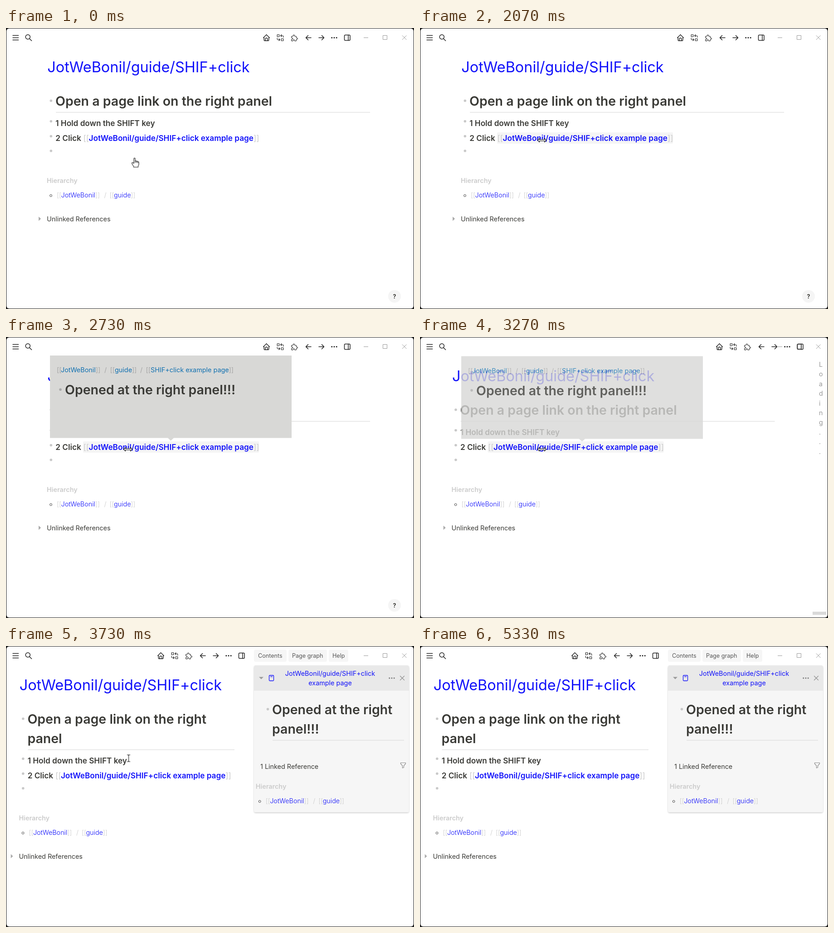
Write an HTML page that moves like this. It is 900 px wide and 622 px high and loops after 5.99 s.

```html
<!DOCTYPE html>
<html lang="en">
<head>
<meta charset="utf-8">
<title>Open a page link on the right panel</title>
<style>
html, body { margin: 0; width: 100%; height: 100%; overflow: hidden; background: #1c1c1c; }
svg {
  display: block; width: 900px; height: 622px;
  font: 14.4px Inter, sans-serif; font-optical-sizing: none;
  animation: panel 5990ms step-end infinite;
}
text { fill: #3a3a36; white-space: pre; }
.title { font-size: 32.4px; }
.h1 { font-size: 28.5px; font-weight: 600; }
.h3 { font-size: 17.17px; font-weight: 600; }
.link { fill: #1212fa; }
.ref { fill: #1070b0; }
.faint { fill: #cbcbcb; }
.light { font-weight: 300; }
.normal { font-weight: 400; }
.tab { font-size: 12.6px; fill: #555; }
.load { fill: #999; }
.slash { fill: #a5a5a5; }
.dot { fill: #c9c9c9; }
.line { fill: #dcdcdc; }
.ico { fill: none; stroke: #222; stroke-width: 1.5; stroke-linecap: round; stroke-linejoin: round; }
.big { stroke-width: 1.9; }
.grey { stroke: #8f8f8f; stroke-width: 1.2; }
.blue { stroke: #1212fa; stroke-width: 1.3; }
.thin { fill: none; stroke: #999; }

/* Visible only while the current state --s equals the element's own --n. */
.pick { opacity: calc(1 - max(var(--s) - var(--n), var(--n) - var(--s))); }

.main { transform: translateX(calc(-1 * min(61.6px, .6 * var(--w)))); }
.icons { transform: translateX(calc(min(1, var(--s)) * (120px - var(--w)))); }
.side { transform: translateX(calc(353px - var(--w))); }
.below { transform: translateY(calc(43px * var(--wrap))); }
.rule { width: min(693px, calc(808.6px - var(--w))); }
.flat { fill-opacity: calc(1 - var(--wrap)); }
.wrapped { fill-opacity: var(--wrap); }

.hover { animation: hover 5990ms linear infinite; }
.popup { animation: popup 5990ms linear infinite; }
.cursor { animation: move 5990ms linear infinite, shape 5990ms step-end infinite; }
.cursor path { fill: #fff; stroke: #111; stroke-width: 1.1; stroke-linejoin: round; }
.cursor .beam { fill: none; }

/* --w panel width, --s panel state, --wrap heading on two lines */
@keyframes panel {
  0% { --w: 0px; --s: 0; --wrap: 0; }
  53.41% { --w: 8px; --s: 1; --wrap: 0; }
  54.57% { --w: 34px; --s: 1; --wrap: 0; }
  55.58% { --w: 110px; --s: 2; --wrap: 0; }
  56.75% { --w: 195px; --s: 2; --wrap: 0; }
  57.92% { --w: 265px; --s: 2; --wrap: 0; }
  58.92% { --w: 314px; --s: 2; --wrap: 0; }
  60.08% { --w: 340px; --s: 2; --wrap: 1; }
  61.25% { --w: 350px; --s: 2; --wrap: 1; }
  62.26%, 100% { --w: 353px; --s: 3; --wrap: 1; }
}
@keyframes hover {
  0%, 16.68% { opacity: 0; animation-timing-function: steps(4, start); }
  21.1%, 60.07% { opacity: 1; }
  60.08%, 100% { opacity: 0; }
}
@keyframes popup {
  0%, 38.8% { opacity: 0; transform: translate(97px, 50.6px); animation-timing-function: steps(3, start); }
  42.1% { opacity: .51; transform: translate(97px, 45.3px); animation-timing-function: steps(4, start); }
  46.5%, 53.3% { opacity: 1; transform: translate(97px, 40.6px); }
  53.31% { opacity: 1; transform: translate(91px, 40.6px); animation-timing-function: steps(2, start); }
  55.5% { opacity: .8; transform: translate(91px, 42.4px); animation-timing-function: steps(4, start); }
  59.9% { opacity: .13; transform: translate(91px, 49.5px); animation-timing-function: steps(2, start); }
  62.1%, 100% { opacity: 0; transform: translate(91px, 50.6px); }
}
@keyframes move {
  0%, 2.16% { transform: translate(283.5px, 287.5px); animation-timing-function: steps(9, start); }
  12.18% { transform: translate(283px, 272px); animation-timing-function: steps(9, start); }
  22.2%, 25.53% { transform: translate(270.7px, 251.5px); animation-timing-function: steps(9, start); }
  35.55%, 56.74% { transform: translate(269px, 248.5px); }
  56.75%, 63.4% { transform: translate(270.5px, 248.5px); animation-timing-function: steps(7, start); }
  71.2%, 73.4% { transform: translate(235.5px, 278.5px); animation-timing-function: steps(9, start); }
  83.4% { transform: translate(186px, 511px); animation-timing-function: steps(6, start); }
  89.9%, 100% { transform: translate(162px, 626px); }
}
/* 0 hand, 1 text beam, 2 resize, 3 arrow */
@keyframes shape {
  0% { --s: 0; }
  6.67% { --s: 1; }
  16.68% { --s: 0; }
  33.37% { --s: 2; }
  56.75% { --s: 1; }
  67.93% { --s: 0; }
  75.6%, 100% { --s: 3; }
}
</style>
</head>
<body>
<svg viewBox="0 0 900 622">
  <defs>
    <clipPath id="tabs"><rect width="765" height="40"/></clipPath>
    <filter id="shadow" x="-5%" y="-5%" width="110%" height="112%">
      <feDropShadow dx="0" dy="1.5" stdDeviation="1.5" flood-opacity=".2"/>
    </filter>
    <g id="tree">
      <text class="faint" x="90" y="343" font-weight="600">Hierarchy</text>
      <circle cx="99" cy="371" r="2.4" fill="none" stroke="#444"/>
      <text class="faint light" y="375"><tspan x="112">[[</tspan><tspan class="link" x="121.5">JotWeBonil</tspan>]]<tspan x="216.5">/</tspan><tspan x="228.5">[[</tspan><tspan class="link" x="238">guide</tspan>]]</text>
    </g>
    <g id="dots" stroke="none"><circle cx="-5.2" r="1.5"/><circle r="1.5"/><circle cx="5.2" r="1.5"/></g>
  </defs>

  <rect x="1" y="1" width="898" height="620" rx="6" fill="#fff"/>

  <g class="main">
    <text class="title link" x="91.3" y="97.5">JotWeBonil/guide/SHIF+click</text>
    <circle class="dot" cx="99.3" cy="161" r="2.8"/>
    <text class="h1" x="109" y="171.8">Open a page link on the right <tspan class="flat">panel</tspan></text>
    <text class="h1 wrapped" x="109" y="214.8">panel</text>
    <g class="below">
      <rect class="line rule" x="110" y="186" height="1.2"/>
      <circle class="dot" cx="99.3" cy="206.5" r="2.8"/>
      <circle class="dot" cx="99.3" cy="239.5" r="2.8"/>
      <circle class="dot" cx="99.3" cy="272" r="2.8"/>
      <rect class="hover" x="170" y="231" width="388" height="25" rx="2" fill="#f5f5f5"/>
      <text class="h3" x="109.3" y="217">1 Hold down the SHIFT key</text>
      <text class="h3" x="109.3" y="250">2 Click</text>
      <text class="h3 faint" y="250"><tspan class="normal" x="170.5">[[</tspan><tspan class="link" x="182.5">JotWeBonil/guide/SHIF+click example page</tspan><tspan class="normal">]]</tspan></text>
      <use href="#tree"/>
      <path d="M72 417.5l5 4.8-5 4.8z" fill="#aaa"/>
      <text x="90" y="428.3">Unlinked References</text>
    </g>
  </g>

  <path class="ico" d="M15 16.5h12.5M15 21.5h12.5M15 26.5h12.5M52 23.7l4.5 4.5"/>
  <circle class="ico" cx="48.2" cy="19.8" r="5"/>
  <path class="thin" d="M789 21.5h10M831.5 16.5h9v9h-9zM874 16.5l9.5 9.5m0-9.5l-9.5 9.5"/>

  <g clip-path="url(#tabs)">
    <g class="side">
      <g fill="#f6f6f6">
        <rect x="547" y="8" width="72" height="27" rx="4"/>
        <rect x="623" y="8" width="85" height="27" rx="4"/>
        <rect x="712" y="8" width="43" height="27" rx="4"/>
      </g>
      <text class="tab" y="26"><tspan x="556">Contents</tspan><tspan x="631">Page graph</tspan><tspan x="720">Help</tspan></text>
    </g>
  </g>

  <g class="side">
    <g class="pick" style="--n:1">
      <text class="load" x="561 561 561 561 561 561 561 561 561 561" y="66 87.4 108.8 130.2 151.6 173 194.4 215.8 237.2 258.6">Loading...</text>
      <rect x="547" y="608" width="30" height="7" fill="#d9d9d9"/>
    </g>
    <text class="pick load" style="--n:2" x="560.5" y="66">Loading ...</text>
    <g class="pick" style="--n:3">
      <rect x="547" y="43" width="342" height="325" rx="4" fill="#f6f6f6" filter="url(#shadow)"/>
      <path d="M547 99V47a4 4 0 0 1 4-4h334a4 4 0 0 1 4 4v52z" fill="#e9e9e9"/>
      <path d="M558 68.5h10l-5 5z" fill="#999"/>
      <rect class="ico blue" x="580.5" y="65" width="10" height="12" rx="1.5"/>
      <path class="ico blue" d="M583.5 67.8h4"/>
      <g text-anchor="middle">
        <text class="link" x="715" y="66">JotWeBonil/guide/SHIF+click</text>
        <text class="link" x="715" y="87.3">example page</text>
      </g>
      <use href="#dots" x="851" y="71" fill="#777"/>
      <path class="ico grey" d="M869.5 66.5l9 9m0-9l-9 9"/>
      <circle class="dot" cx="577.5" cy="139.8" r="2.8"/>
      <text class="h1" x="587" y="150.5">Opened at the right</text>
      <text class="h1" x="587" y="193.5">panel!!!</text>
      <rect class="line" x="588" y="208" width="290" height="1.2"/>
      <text x="561" y="272">1 Linked Reference</text>
      <path class="ico grey" d="M870.5 258.5h11v2l-4 4.5v4l-3 1v-5l-4-4.5z"/>
      <use href="#tree" x="460.7" y="-27"/>
    </g>
  </g>

  <g class="icons">
    <path class="ico big" transform="translate(565.5 12.5) scale(.75)" d="M5 12H3l9-9 9 9h-2M5 12v7a2 2 0 0 0 2 2h10a2 2 0 0 0 2-2v-7M9 21v-6a2 2 0 0 1 2-2h2a2 2 0 0 1 2 2v6"/>
    <path class="ico" transform="translate(596 12.5) scale(.75)" d="M3 3h6v6H3zM15 15h6v6h-6zM21 11V8a2 2 0 0 0-2-2h-6l3 3m0-6l-3 3M3 13v3a2 2 0 0 0 2 2h6l-3-3m0 6l3-3"/>
    <path class="ico" transform="translate(627.5 13) scale(.75)" d="M4 7h3a1 1 0 0 0 1-1V5a2 2 0 0 1 4 0v1a1 1 0 0 0 1 1h3a1 1 0 0 1 1 1v3a1 1 0 0 0 1 1h1a2 2 0 0 1 0 4h-1a1 1 0 0 0-1 1v3a1 1 0 0 1-1 1h-3a1 1 0 0 1-1-1v-1a2 2 0 0 0-4 0v1a1 1 0 0 1-1 1H4a1 1 0 0 1-1-1v-3a1 1 0 0 1 1-1h1a2 2 0 0 0 0-4H4a1 1 0 0 1-1-1V8a1 1 0 0 1 1-1"/>
    <path class="ico" d="M673 21.5h-11.5l5-5m-5 5l5 5M690 21.5h11.5l-5-5m5 5l-5 5"/>
    <use href="#dots" x="724" y="21.5" fill="#222"/>
    <rect class="ico" x="746.5" y="15.5" width="12.5" height="12" rx="2"/>
    <path class="ico" d="M755 15.5v12"/>
  </g>

  <g class="pick" style="--n:0">
    <circle cx="857" cy="594" r="14" fill="#f5f5f5"/>
    <text x="857" y="598.6" font-size="12.6" font-weight="700" text-anchor="middle">?</text>
  </g>

  <g class="popup">
    <path d="M0 0h533v183H273l-6.5 6-6.500-6H0z" fill="#d8d8d6"/>
    <text class="slash" y="37.4"><tspan x="15">[[</tspan><tspan class="ref" x="24">JotWeBonil</tspan>]]<tspan x="120">/</tspan><tspan x="132.5">[[</tspan><tspan class="ref" x="143">guide</tspan>]]<tspan x="199">/</tspan><tspan x="211.5">[[</tspan><tspan class="ref" x="222">SHIF+click example page</tspan>]]</text>
    <circle cx="23" cy="75.7" r="2.8" fill="#aaa"/>
    <text class="h1" x="33" y="86.4">Opened at the right panel!!!</text>
  </g>

  <g class="cursor">
    <path class="pick" style="--n:0" d="M-1.5 1.5Q0-.8 1.5 1.5V7q1.8-1 3 .6 1.8-.8 2.8.8 2.2-.4 2.2 1.8V14q0 2-1.5 4v2.5H-2v-2Q-4 16-5.5 13q-1-2.5 1-2.7 1.5 0 3 2zM1.5 7v4M4.5 7.6V11M7.3 8.4v3"/>
    <path class="pick beam" style="--n:1" d="M-3.5-7.5h2.5l1 1 1-1h2.5M0-6.5v13M-3.5 7.5h2.5l1-1 1 1h2.5"/>
    <path class="pick" style="--n:2" d="M-9.5 0l4-4v2.5h11V-4l4 4-4 4V1.5h-11V4z"/>
    <path class="pick" style="--n:3" d="M0 0v16l3.7-3.5 2.4 5.3 2.2-1-2.3-5.2h5z"/>
  </g>
</svg>
</body>
</html>
```
